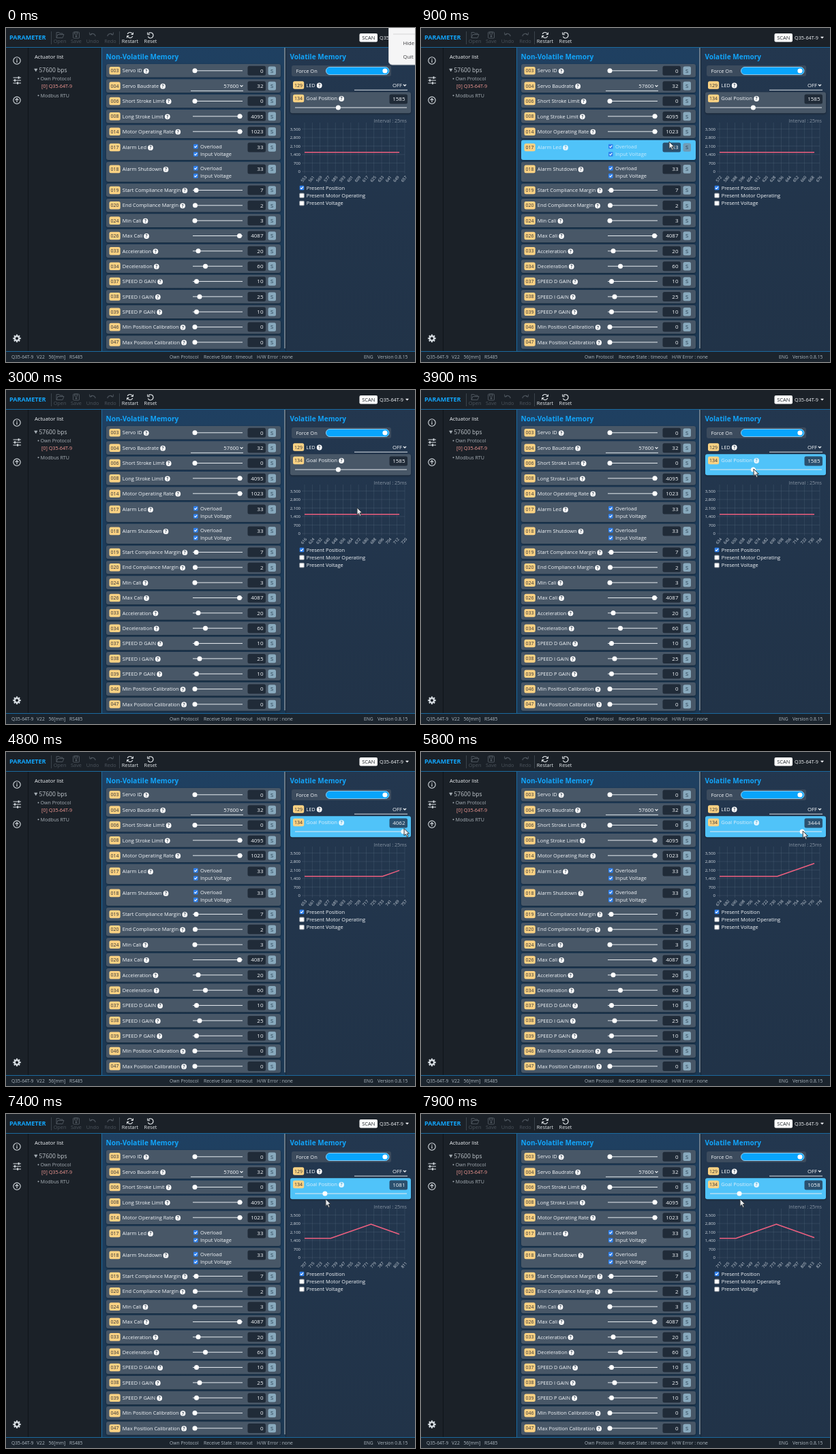
An HTML page with a canvas that plays this animation: 600x491 px, repeating every 8 s.

```html
<!DOCTYPE html>
<html lang="en">
<head>
<meta charset="utf-8">
<title>Actuator parameters</title>
<style>
html, body { margin: 0; width: 100%; height: 100%; overflow: hidden; background: #1b2128; }
canvas { display: block; width: 600px; height: 491px; }
</style>
</head>
<body>
<canvas id="stage"></canvas>
<script>
const W = 600, H = 491, LOOP = 8000, STEP = 100;
const MODEL = 'Q35-64T-9';
const FONT = '"Open Sans", "Noto Sans", sans-serif';
const BLUE = '#12a5fb', EDGE = '#1b6a9f', ROW = '#485767', HOT = '#50c3f9', WHITE = '#f4f7fa', DARK = '#202b38';

const canvas = document.getElementById('stage');
const dpr = window.devicePixelRatio || 1;
canvas.width = W * dpr;
canvas.height = H * dpr;
const c = canvas.getContext('2d');

// id, label, value, slider knob x
const params = [
  ['003', 'Servo ID', 0, 277], ['004', 'Servo Baudrate', 32, 'select'],
  ['006', 'Short Stroke Limit', 0, 277], ['008', 'Long Stroke Limit', 4095, 343],
  ['014', 'Motor Operating Rate', 1023, 343], ['017', 'Alarm Led', 33, 'checks'],
  ['018', 'Alarm Shutdown', 33, 'checks'], ['019', 'Start Compliance Margin', 7, 279],
  ['020', 'End Compliance Margin', 2, 277.5], ['024', 'Min Cali', 3, 277],
  ['026', 'Max Cali', 4087, 342.5], ['033', 'Acceleration', 20, 282],
  ['034', 'Deceleration', 60, 292.5], ['037', 'SPEED D GAIN', 10, 279.5],
  ['038', 'SPEED I GAIN', 25, 284], ['039', 'SPEED P GAIN', 10, 279.5],
  ['046', 'Min Position Calibration', 0, 277], ['047', 'Max Position Calibration', 0, 277]
];
let nextY = 53;
const rows = params.map(([id, label, value, kind]) => {
  const h = kind === 'checks' ? 29.2 : 19.6;
  const row = { id, label, value, kind, y: nextY, h };
  nextY += h + 2.75;
  return row;
});

// time, x, y of the pointer
const path = [
  [0, 625, 10], [200, 592, 24], [650, 385, 176], [900, 364, 167], [1150, 364, 166],
  [1700, 452, 103], [2300, 508, 165], [3000, 515, 173], [3350, 512, 168], [3700, 488, 116],
  [3900, 488, 116], [4500, 584, 112], [5600, 584, 114], [6200, 492, 122],
  [6700, 479, 124], [7300, 469, 125], [8000, 468, 125]
];

function pointer(t) {
  let i = 1;
  while (i < path.length - 1 && path[i][0] < t) i++;
  const [t0, x0, y0] = path[i - 1], [t1, x1, y1] = path[i];
  let k = Math.max(0, Math.min(1, (t - t0) / (t1 - t0)));
  k = k * k * (3 - 2 * k);
  return [x0 + (x1 - x0) * k, y0 + (y1 - y0) * k];
}

function goalAt(t) {
  if (t <= 3900) return 1585;
  const v = Math.round((pointer(t)[0] - 478) / 0.0386 + 1316);
  return Math.max(1042, Math.min(4087, v));
}

function position(n) {
  if (n < 734) return 1585;
  return n < 776 ? 1585 + (n - 734) * 27.7 : 2748 - (n - 776) * 28.2;
}

function text(s, x, y, size = 7.45, color = WHITE, align = 'left', weight = 400) {
  c.font = `${weight} ${size}px ${FONT}`;
  c.fillStyle = color;
  c.textAlign = align;
  c.textBaseline = 'alphabetic';
  c.fillText(s, x, y + size * 0.36);
  return c.measureText(s).width;
}

function rect(x, y, w, h, color) {
  c.fillStyle = color;
  c.fillRect(x, y, w, h);
}

function box(x, y, w, h, r, fill, stroke) {
  c.beginPath();
  c.roundRect(x, y, w, h, r);
  if (fill) { c.fillStyle = fill; c.fill(); }
  if (stroke) { c.strokeStyle = stroke; c.lineWidth = 1; c.stroke(); }
}

function card(x, y, w, h, hot) {
  c.save();
  c.shadowColor = 'rgba(0,0,0,0.4)';
  c.shadowBlur = 3 * dpr;
  c.shadowOffsetY = dpr;
  box(x, y, w, h, 3, hot ? HOT : ROW);
  c.restore();
}

function dot(x, y, r, color) {
  c.beginPath();
  c.arc(x, y, r, 0, 7);
  c.fillStyle = color;
  c.fill();
}

function line(points, color, width = 1, fill) {
  c.beginPath();
  points.forEach(([x, y]) => c.lineTo(x, y));
  if (fill) { c.closePath(); c.fillStyle = fill; c.fill(); }
  c.strokeStyle = color;
  c.lineWidth = width;
  c.stroke();
}

function arc(x, y, r, from, to, color, width = 1) {
  c.beginPath();
  c.arc(x, y, r, from, to);
  c.strokeStyle = color;
  c.lineWidth = width;
  c.stroke();
}

function gradient(x, y, w, h, top, bottom) {
  const g = c.createLinearGradient(0, y, 0, y + h);
  g.addColorStop(0, top);
  g.addColorStop(1, bottom);
  rect(x, y, w, h, g);
}

function chevron(x, y) {
  line([[x - 2, y - 1], [x, y + 1], [x + 2, y - 1]], WHITE, 1.2);
}

function check(x, y, on, label, color = WHITE) {
  box(x, y - 3.3, 6.6, 6.6, 1, on ? '#2f80ed' : '#fff', on ? null : '#8a929b');
  if (on) line([[x + 1.4, y], [x + 2.8, y + 1.5], [x + 5.3, y - 1.6]], '#fff', 1.1);
  text(label, x + 10, y, 7.45, color);
}

function slider(x0, x1, knob, y) {
  rect(x0, y - 0.5, x1 - x0, 1, '#e6ebef');
  dot(knob, y, 3.5, '#fff');
}

function heading(id, label, x, y, hot) {
  box(x, y - 5.8, 16.2, 11.6, 2.5, '#fbd283');
  text(id, x + 8.1, y, 7, '#2b3038', 'center');
  c.globalAlpha = hot ? 0.85 : 1;
  const end = x + 19.3 + text(label, x + 19.3, y);
  dot(end + 6, y + 0.5, 3.9, '#fff');
  text('?', end + 6, y + 0.6, 6.5, hot ? '#3a9fce' : '#3b4959', 'center', 700);
  c.globalAlpha = 1;
}

function valueBox(x, y, value, hot) {
  box(x, y - 7, 26.5, 14, 2.5, hot ? '#2b506e' : DARK);
  text(value, x + 23, y, 8, WHITE, 'right');
}

function paramRow(r, hot) {
  const mid = r.kind === 'checks' ? r.y + 10.7 : r.y + r.h / 2;
  card(147, r.y, 256, r.h, hot);
  heading(r.id, r.label, 151.5, mid, hot);
  if (r.kind === 'checks') {
    const color = hot ? '#c4eafc' : WHITE;
    check(275, mid - 1.3, true, 'Overload', color);
    check(275, mid + 10, true, 'Input Voltage', color);
  } else if (r.kind === 'select') {
    text('57600', 341.5, mid, 7.8, WHITE, 'right');
    chevron(345.5, mid);
    rect(271, mid + 6.7, 77, 1, '#dce3e9');
  } else {
    slider(274, 347, r.kind, mid);
  }
  valueBox(354.5, mid, r.value, hot);
  box(384.5, mid - 6.3, 11.5, 12.6, 2.5, hot ? '#709bb5' : '#88a9bd');
  text('S', 390.2, mid, 7.6, '#24394b', 'center');
}

function toolIcon(x, y, kind, color) {
  if (kind === 'Open') {
    line([[x - 5, y + 4], [x - 5, y - 4], [x - 1, y - 4], [x, y - 2.5], [x + 4, y - 2.5], [x + 4, y - 1]], color);
    line([[x - 5, y + 4], [x - 3, y - 1], [x + 6, y - 1], [x + 4, y + 4], [x - 5, y + 4]], color);
  } else if (kind === 'Save') {
    box(x - 4.5, y - 4.5, 9, 9, 1, null, color);
    c.strokeRect(x - 2.5, y - 4.5, 4.5, 3);
    dot(x, y + 1.5, 1.5, color);
  } else if (kind === 'Restart') {
    arc(x, y, 4, -2.8, -0.4, color, 1.2);
    arc(x, y, 4, 0.35, 2.75, color, 1.2);
    line([[x + 4.6, y - 4], [x + 4.4, y - 1], [x + 1.5, y - 1]], color);
    line([[x - 4.6, y + 4], [x - 4.4, y + 1], [x - 1.5, y + 1]], color);
  } else {
    c.save();
    c.translate(x, y);
    c.scale(kind === 'Redo' ? -1 : 1, 1);
    if (kind === 'Reset') arc(0, 0.3, 4, -2.5, 2.7, color, 1.2);
    else arc(0, 2, 4.2, -2.6, -0.1, color, 1.2);
    line([[-4.5, -4], [-4.2, -0.7], [-1, -0.9]], color);
    c.restore();
  }
}

function sideIcons() {
  const col = '#d7dde2';
  arc(16, 48, 5.2, 0, 7, col, 1.1);
  rect(15.4, 47.2, 1.2, 3.6, col);
  rect(15.4, 45, 1.2, 1.3, col);
  [[73, 18.5], [77, 13], [81, 17]].forEach(([y, x]) => {
    rect(10.5, y - 0.5, 11.5, 1, col);
    rect(x - 0.8, y - 1.7, 1.8, 3.4, col);
  });
  arc(16, 106.3, 5.2, 0, 7, col, 1.1);
  line([[16, 109.3], [16, 103.7]], col, 1.1);
  line([[13.7, 106], [16, 103.7], [18.3, 106]], col, 1.1);
  for (let i = 0; i < 8; i++) {
    const a = i * Math.PI / 4, x = Math.cos(a), y = Math.sin(a);
    line([[16 + x * 3.5, 456.3 + y * 3.5], [16 + x * 5.8, 456.3 + y * 5.8]], col, 2.2);
  }
  arc(16, 456.3, 3.2, 0, 7, col, 2.2);
}

function frameParts() {
  rect(0, 0, W, H, '#1b2128');
  gradient(141, 29, 270, 447, '#1f4061', '#1c3853');
  gradient(411, 29, 189, 447, '#23374f', '#213348');
  rect(0, 28, W, 1, EDGE);
  rect(32, 29, 1, 447, '#0f1419');
  rect(140, 29, 1, 447, EDGE);
  rect(408, 29, 2, 442, '#697887');
  rect(410, 29, 1, 447, '#172636');

  text('PARAMETER', 5, 14, 9.05, BLUE, 'left', 700);
  rect(66, 5, 1, 19, '#3a434b');
  rect(166, 5, 1, 19, '#3a434b');
  [['Open', 79], ['Save', 103], ['Undo', 127], ['Redo', 153], ['Restart', 182], ['Reset', 212]]
    .forEach(([name, x], i) => {
      const color = i < 4 ? '#4c545c' : '#e5e9ec';
      toolIcon(x, 10.5, name, color);
      text(name, x, 19.3, 7.3, color, 'center');
    });
  box(518.5, 8, 26.5, 12.5, 2, '#fff');
  text('SCAN', 531.8, 14.3, 7.5, '#20262c', 'center');
  text(MODEL, 548, 14, 7.3);
  line([[586.5, 13], [590.5, 13], [588.5, 15.3]], WHITE, 0.5, WHITE);

  sideIcons();
  text('Actuator list', 42, 42.7, 7.6);
  line([[41.5, 60], [46, 60], [43.8, 64]], '#a8b0b7', 0.5, '#a8b0b7');
  text('57600 bps', 48.5, 61.5, 8.5, '#c3c9ce');
  dot(47.5, 74.5, 1, '#a8b0b7');
  text('Own Protocol', 50.5, 74.3, 7.1, '#a8b0b7');
  text('[0] ' + MODEL, 52, 85.5, 7.2, '#f59a94');
  dot(47.5, 99.3, 1, '#a8b0b7');
  text('Modbus RTU', 50.5, 99, 7.1, '#a8b0b7');

  rect(0, 476, W, 15, '#1b242d');
  rect(0, 475, W, 1, EDGE);
  [[MODEL, 8], ['V22', 45], ['56[mm]', 62.5], ['RS485', 93], ['Own Protocol', 240],
    ['Receive State : timeout', 290], ['H/W Error : none', 368], ['ENG', 525], ['Version 0.8.15', 545]]
    .forEach(([s, x]) => text(s, x, 483.3, 6.75, '#adb8c1'));
}

function chart(t) {
  const first = Math.round(553.3 + t * 0.02076);
  const px = n => 438 + (n - first) * 1.413;
  const py = v => 211 - v * 0.01786;
  text('Interval : 25ms', 588, 136.5, 7.1, '#8794a3', 'right');
  for (let v = 0; v <= 3500; v += 700) {
    rect(434, py(v) - 0.4, 151, 0.8, 'rgba(150,170,190,0.17)');
    text(v.toLocaleString('en-US'), 432, py(v), 6, '#d5dce3', 'right');
  }
  for (let i = 0; i < 14; i++) {
    const x = px(first + i * 8);
    rect(x - 0.4, 139, 0.8, 75, 'rgba(150,170,190,0.17)');
    c.save();
    c.translate(x + 2, 218);
    c.rotate(-0.87);
    text(first + i * 8, 0, 0, 5.8, '#d5dce3', 'right');
    c.restore();
  }
  const last = first + 98.4;
  const points = [first, 734, 776, last].filter(n => n >= first && n <= last);
  c.lineJoin = 'round';
  line(points.map(n => [px(n), py(position(n))]), '#ee5f7f', 1.5);
  check(430.7, 235, true, 'Present Position');
  check(430.7, 246.3, false, 'Present Motor Operating');
  check(430.7, 257.6, false, 'Present Voltage');
}

function volatilePanel(t) {
  const hot = t >= 3700;
  text('Volatile Memory', 416.5, 42.2, 10.06, BLUE, 'left', 700);
  box(419, 55, 146, 16, 3, '#3c4b5d');
  text('Force On', 425.5, 63, 7.45);
  box(469.5, 57.5, 92.5, 11, 5.5, '#08a4fb', '#8ccdf2');
  dot(556, 63, 3.6, '#fff');

  heading('129', 'LED', 421, 84, false);
  text('OFF', 581, 84, 7.8, WHITE, 'right');
  chevron(585, 84);
  rect(511, 90.7, 78, 1, '#dce3e9');

  const goal = goalAt(t);
  card(417, 94.3, 177, 31, hot);
  heading('134', 'Goal Position', 421, 103.5, hot);
  valueBox(562.5, 104.5, goal, hot);
  slider(424, 588, 426.2 + goal * 0.0386, 117);
}

function menu() {
  box(561.5, -8, 60, 62, 5, '#f5f5f6', '#c9ccd0');
  rect(568, 8.5, 32, 1, '#d5d6d8');
  text('Hide', 582.5, 22.5, 7.6, '#3b3b3d');
  text('Quit', 582.5, 42, 7.6, '#3b3b3d');
}

function arrow(x, y) {
  c.save();
  c.translate(x, y);
  c.lineJoin = 'round';
  line([[0, 0], [0, 10.5], [2.4, 8.4], [4.2, 12.4], [6, 11.6], [4.2, 7.7], [7.4, 7.5], [0, 0]],
    '#30363d', 1, '#e9ecee');
  c.restore();
}

function draw(t) {
  c.setTransform(dpr, 0, 0, dpr, 0, 0);
  frameParts();
  const [hx, hy] = pointer(Math.max(0, t - STEP));
  text('Non-Volatile Memory', 146.5, 42.2, 10.06, BLUE, 'left', 700);
  rows.forEach(r => paramRow(r, hx >= 147 && hx <= 403 && hy >= r.y && hy <= r.y + r.h));
  volatilePanel(t);
  chart(t);
  if (t < 200) menu();
  arrow(...pointer(t));
}

function tick(now) {
  draw(Math.floor(now % LOOP / STEP) * STEP);
  requestAnimationFrame(tick);
}
draw(0);
requestAnimationFrame(tick);
</script>
</body>
</html>
```
